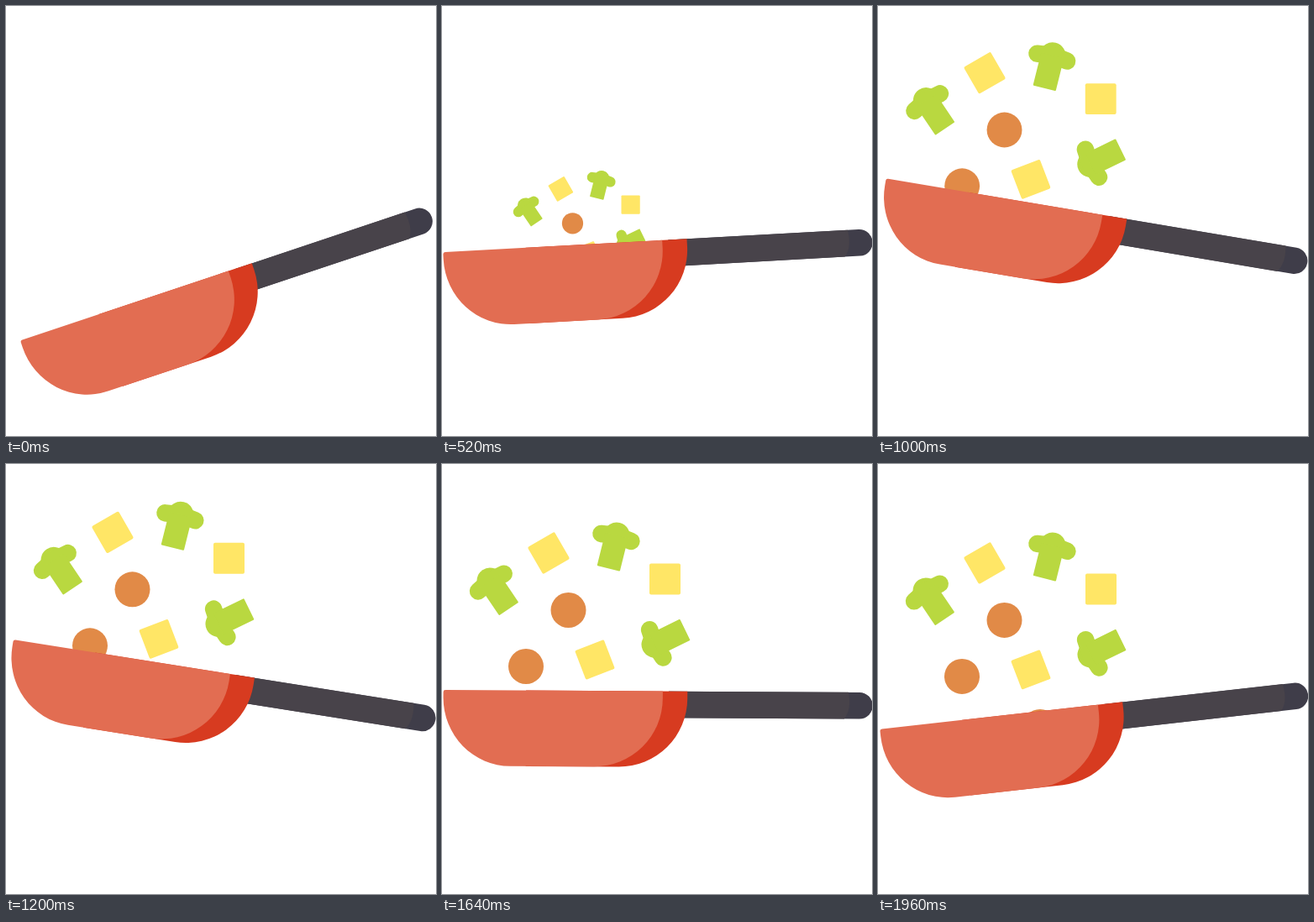
Recreate the animation shown at these times as an HTML page. Size 512 px wide and 512 px high, loop 2000 ms.

```html
<!DOCTYPE html>
<html lang="en">
<head>
<meta charset="utf-8">
<title>Tossing vegetables</title>
<style>
  html, body { margin: 0; width: 100%; height: 100%; overflow: hidden; background: #fff; }
  svg { display: block; width: 100vw; height: 100vh; }
</style>
</head>
<body>
<svg viewBox="0 0 512 512">
  <defs>
    <g id="broccoli" fill="#b9d840">
      <circle r="15.5"/>
      <path d="M-18.5 2.5L0 0L18.5 2.5" fill="none" stroke="#b9d840" stroke-width="20.5" stroke-linecap="round"/>
      <rect x="-14" width="28" height="40.5" rx="1"/>
    </g>
    <rect id="cube" x="-18.5" y="-18.5" width="37" height="37" rx="2" fill="#ffe666"/>
    <circle id="carrot" r="21" fill="#e18a47"/>
  </defs>
  <g id="food">
    <use href="#broccoli" transform="translate(57 114) rotate(-34)"/>
    <use href="#broccoli" transform="translate(208 60) rotate(14)"/>
    <use href="#broccoli" transform="translate(253 190) rotate(-116)"/>
    <use href="#cube" transform="translate(127 81) rotate(-30)"/>
    <use href="#cube" transform="translate(265.5 112)"/>
    <use href="#cube" transform="translate(182 208) rotate(-21)"/>
    <use href="#carrot" x="150.5" y="149"/>
    <use href="#carrot" x="100" y="216"/>
    <use href="#carrot" x="193" y="276"/>
  </g>
  <!-- drawn around the pivot on the handle -->
  <g id="pan">
    <path fill="#3f3d49" d="M-130-15.6H97a15.8 15.8 0 0 1 0 31.6H-130z"/>
    <path fill="#48434a" d="M-130-15.6H84Q88 5 79 16H-130z"/>
    <path fill="#d73b20" d="M-300-15.8H-107.8V-7A81.5 81.5 0 0 1-189.3 74.5H-300z"/>
    <path fill="#e26d52" d="M-396-15.8H-137.2V-7A81.5 81.5 0 0 1-218.7 74.5H-318.5A80 81.5 0 0 1-398.5-7V-13.3Q-398.5-15.8-396-15.8z"/>
  </g>
</svg>
<script>
const LOOP = 2000, RISE = 1040;
const food = document.getElementById('food');
const pan = document.getElementById('pan');

// [time in ms, tilt in degrees]
const tilt = [[0, -18.5], [260, -12.2], [520, -3.2], [800, 6.8], [1060, 9.9],
              [1200, 9], [1480, 4], [1680, -0.6], [1800, -3.2], [1960, -6.4], [2000, -7.1]];

const slope = (a, b) => (b[1] - a[1]) / (b[0] - a[0]);
const ease = u => (1 - Math.cos(Math.PI * u)) / 2;

// Smooth curve through the keys
function spline(keys, t) {
  let i = 0;
  while (i < keys.length - 2 && t >= keys[i + 1][0]) i++;
  const a = keys[i], b = keys[i + 1], d = b[0] - a[0], u = (t - a[0]) / d;
  const m = slope(keys[i - 1] || a, b) * d;
  const n = slope(a, keys[i + 2] || b) * d;
  return a[1] + u * (m + u * (3 * (b[1] - a[1]) - 2 * m - n + u * (2 * (a[1] - b[1]) + m + n)));
}

function draw(now) {
  const t = now % LOOP;
  const rise = ease(Math.min(t / RISE, 1));
  const fall = ease(Math.max((t - RISE) / (LOOP - RISE), 0));
  const scale = 0.2 + 0.8 * rise;
  const drop = 344 * (1 - rise) + 39.4 * fall - 2.3;
  food.setAttribute('transform', `translate(${163 * (1 - scale)} ${drop}) scale(${scale})`);
  pan.setAttribute('transform', `translate(400 287) rotate(${spline(tilt, t)})`);
}

const start = performance.now();
function tick() {
  draw(performance.now() - start);
  requestAnimationFrame(tick);
}
tick();
</script>
</body>
</html>
```
